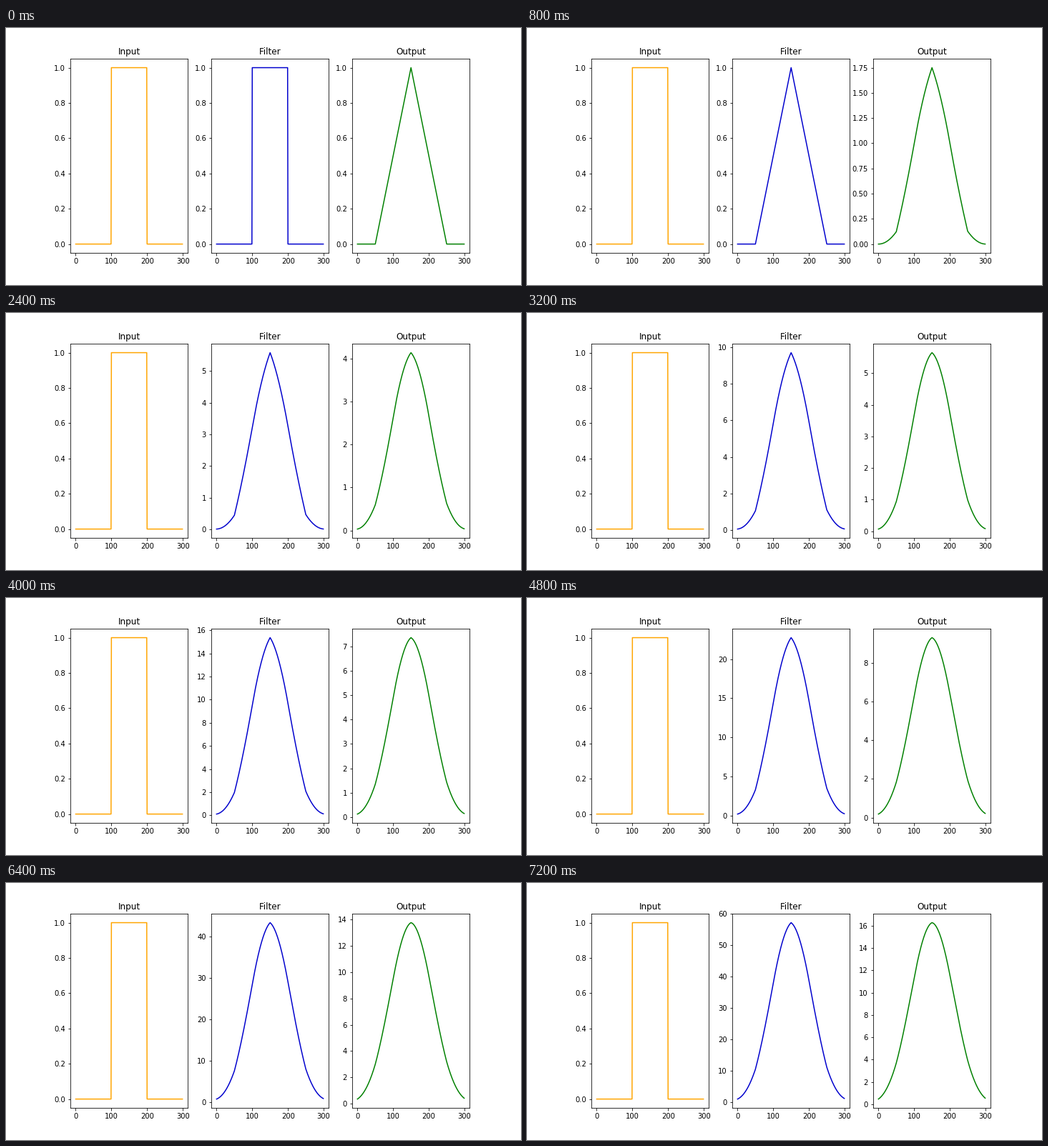
Animation of 720 by 360 pixels, one loop 8 s. Source, as a matplotlib script:

```python
import numpy as np
import matplotlib.pyplot as plt
from matplotlib.animation import FuncAnimation

STEPS = 10
STEP_MS = 800


def build_steps(signal):
    """Return (filter, output) pairs; outputs keep adding up into the filter."""
    kernel = signal
    output = np.convolve(signal, kernel, mode="same") / kernel.sum()
    steps = [(kernel, output)]
    kernel = np.zeros_like(signal)
    for _ in range(STEPS - 1):
        kernel = kernel + output
        blurred = np.convolve(signal, kernel, mode="same")
        output = output + blurred / output.sum()
        steps.append((kernel, output))
    return steps


box = np.repeat([0.0, 1.0, 0.0], 100)
steps = build_steps(box)

plt.rcParams.update({
    "font.family": "DejaVu Sans",
    "text.kerning_factor": 6,  # whole-pixel letter spacing
    "figure.subplot.bottom": 0.125,
})
fig, axes = plt.subplots(1, 3, figsize=(10, 5), dpi=72)

lines = []
for ax, title, color in zip(axes, ("Input", "Filter", "Output"),
                            ("orange", "mediumblue", "green")):
    ax.set_title(title)
    lines += ax.plot(box, color=color)


def draw(i):
    for ax, line, data in zip(axes[1:], lines[1:], steps[i]):
        line.set_ydata(data)
        ax.relim()
        ax.autoscale_view()
    return lines


anim = FuncAnimation(fig, draw, frames=STEPS, init_func=lambda: draw(0),
                     interval=STEP_MS, repeat=True, repeat_delay=0, blit=False)
plt.show()
```
